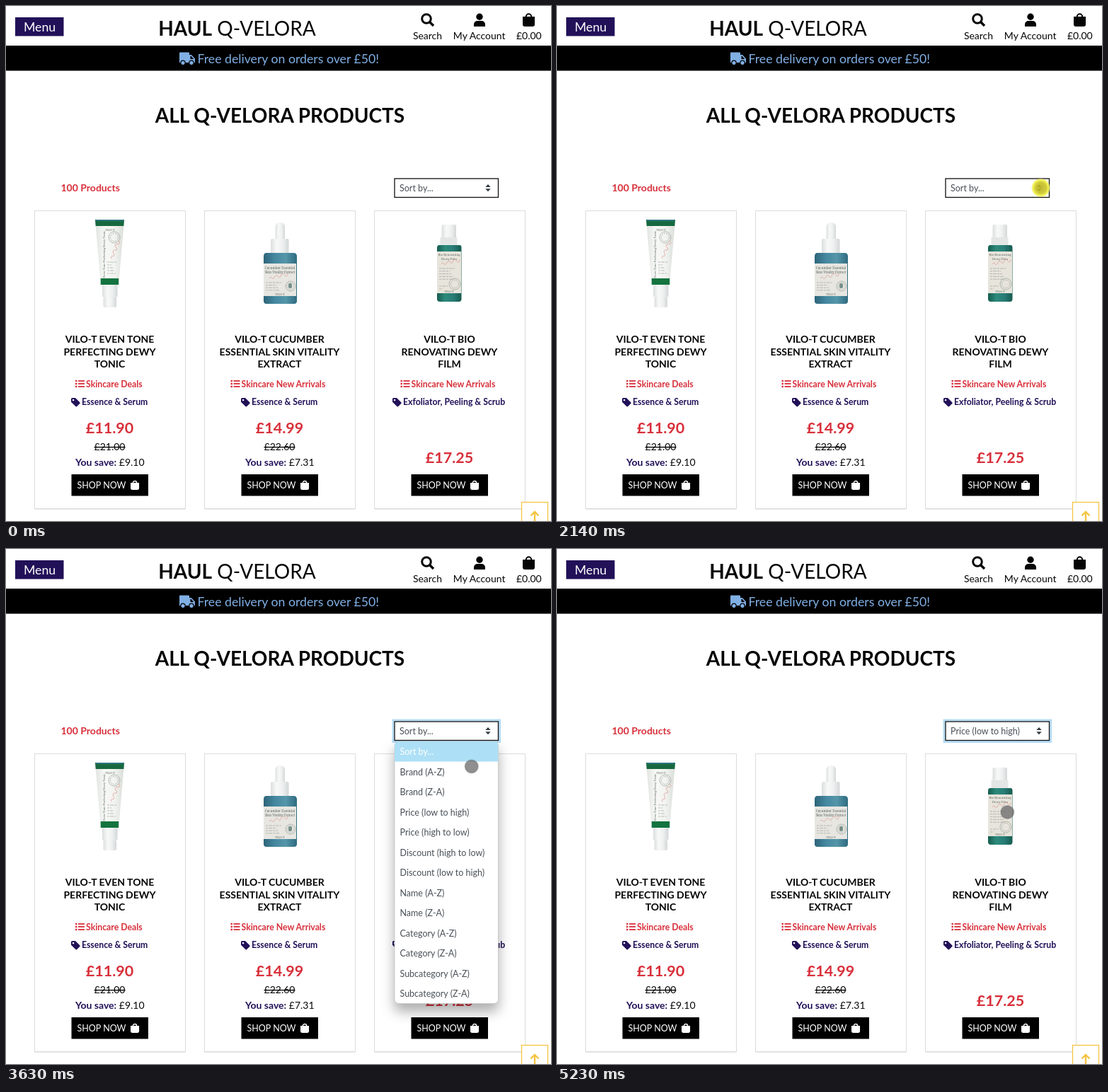
These frames come from a looping animation (770 px wide and 728 px high, 8000 ms). An HTML page:

```html
<!DOCTYPE html>
<html lang="en">
<head>
<meta charset="utf-8">
<title>Shop sorting</title>
<style>
html, body { margin: 0; width: 100%; height: 100%; overflow: hidden; background: #fff; }
svg { display: block; width: 100%; height: 100%; font-family: Lato, sans-serif; }
#menu { filter: drop-shadow(0 11px 9px rgba(0,0,0,.32)); }
.tiny { font-family: "Noto Serif", serif; }
</style>
</head>
<body>
<svg id="stage" viewBox="0 0 770 728"></svg>
<script>
const RED = '#d8303b', NAVY = '#221158', INK = '#050505', SKY = '#80afe4', GOLD = '#f6c443';
const BASE = 14, SMALL = 12.5, LABEL = 12.25, LARGE = 17.7, HUGE = 28;
const ROW = 28.5, MENU_TOP = 272;

const text = (x, y, size, str, fill = INK, weight = 400, anchor = 'start', extra = '') =>
  `<text x="${x}" y="${y}" font-size="${size}" fill="${fill}" font-weight="${weight}" text-anchor="${anchor}" ${extra}>${str}</text>`;
const rect = (x, y, w, h, fill, extra = '') =>
  `<rect x="${x}" y="${y}" width="${w}" height="${h}" fill="${fill}" ${extra}/>`;
const path = (d, fill, extra = '') => `<path d="${d}" fill="${fill}" ${extra}/>`;
const line = (d, stroke, width) => path(d, 'none', `stroke="${stroke}" stroke-width="${width}"`);
const move = (x, y, body, scale = 1) => `<g transform="translate(${x} ${y}) scale(${scale})">${body}</g>`;
const gradient = (id, ...colors) => `<linearGradient id="${id}">` +
  colors.map((c, i) => `<stop offset="${i / (colors.length - 1)}" stop-color="${c}"/>`).join('') + '</linearGradient>';

const bag = (x, y, fill, scale = 1) => move(x, y,
  path('M0 5H17V16a3 3 0 0 1-3 3H3a3 3 0 0 1-3-3Z', fill) +
  line('M4.8 8V5a3.7 3.7 0 0 1 7.4 0V8', fill, 2), scale);

const listIcon = x => [530, 534, 538].map(y =>
  rect(x, y - 1.2, 2.4, 2.4, RED) + rect(x + 4, y - .9, 9, 1.8, RED)).join('');

const tagIcon = x => move(x, 554,
  path('M0 1.5Q0 0 1.5 0H6L12.3 6.2q.8.9 0 1.8L8.2 12q-.9.8-1.8 0L0 5.8ZM3 1.7a1.3 1.3 0 1 0 .1 0Z', NAVY, 'fill-rule="evenodd"'));

const smallPrint = (x, y, w, rows, gap) => Array.from({ length: rows }, (_, i) =>
  `<path d="M${x} ${y + i * gap}h${w - (i * 7) % 9}" stroke="#a0a49f" stroke-width=".7" stroke-dasharray="3 1 5 1"/>`).join('');
const scribble = (x, y, turn = -8) =>
  `<path transform="translate(${x} ${y}) rotate(${turn})" d="M0 0q3-3 4 0t4-1 5 0 4-1 5 0 5-1" fill="none" stroke="#e09a96" stroke-width=".7"/>`;
const seal = (x, y, r) => `<g fill="none" stroke="#9aa29d" stroke-width=".7"><circle cx="${x}" cy="${y}" r="${r}"/>` +
  `<circle cx="${x}" cy="${y}" r="${r * .7}" stroke-dasharray="2 1"/></g>`;
const tiny = (x, y, size, str, extra = '') => text(x, y, size, str, '#59645f', 400, 'middle', 'class="tiny" ' + extra);

const tube =
  path('M126 303H167L159.5 389H133.5Z', 'url(#tubeBody)') +
  path('M126 302H167L166.3 311H126.7Z', '#17683f') + rect(127, 302, 39, 2, '#2c7680') +
  tiny(147, 318, 4, 'VILO-T') + seal(153, 327, 8) +
  tiny(0, 0, 4.2, 'Even Tone Perfecting Dewy Tonic', 'transform="translate(140 351) rotate(-90)"') +
  scribble(149, 357, -62) + smallPrint(143, 362, 13, 5, 4) +
  rect(133.7, 385, 25.5, 9, '#14733f') +
  rect(136, 394, 21.5, 17, 'url(#plastic)') + rect(137.5, 411, 18.5, 15, 'url(#plastic)', 'rx="2"');

const dropper =
  rect(380.5, 306, 13.5, 28, 'url(#plastic)', 'rx="6"') +
  rect(374, 329, 25.5, 21, 'url(#plastic)', 'rx="2"') +
  path('M368 349H406Q411 349 411 354V417Q411 421 407 421H368Q364 421 364 417V354Q364 349 368 349Z', 'url(#blueGlass)') +
  rect(364, 364, 46, 46, '#e7e6e1') +
  tiny(387, 372, 4.5, 'Cucumber Essential') + tiny(387, 378, 4.5, 'Skin Vitality Extract') +
  scribble(372, 385) + smallPrint(367, 391, 22, 4, 3.6) + seal(402, 396, 7) + rect(399, 392, 5, 7, '#77918a', 'rx="2"') +
  tiny(387, 409, 4, 'VILO-T');

const pump =
  rect(615.5, 309, 20.5, 22, 'url(#plastic)', 'rx="2"') + rect(613.5, 327, 24, 12, '#e3e6e5', 'rx="1"') +
  path('M612 338H641Q643.5 338 643.5 342V414Q643.5 418 640 418H613Q609 418 609 414V342Q609 338 612 338Z', 'url(#greenGlass)') +
  rect(609, 347, 34, 59, '#e7e4db') +
  tiny(626, 353, 4.3, 'Bio Renovating') + tiny(626, 359, 4.3, 'Dewy Film') +
  scribble(615, 365) + smallPrint(612, 371, 22, 5, 3.8) + seal(634, 393, 8) + smallPrint(612, 396, 12, 2, 4) +
  tiny(626, 405, 4, 'VILO-T');

const products = [
  { title: ['VILO-T EVEN TONE', 'PERFECTING DEWY', 'TONIC'], list: 'Skincare Deals', listX: 98,
    tag: 'Essence &amp; Serum', tagX: 92, price: '£11.90', old: '£21.00', save: '£9.10', image: tube },
  { title: ['VILO-T CUCUMBER', 'ESSENTIAL SKIN VITALITY', 'EXTRACT'], list: 'Skincare New Arrivals', listX: 317.5,
    tag: 'Essence &amp; Serum', tagX: 332, price: '£14.99', old: '£22.60', save: '£7.31', image: dropper },
  { title: ['VILO-T BIO', 'RENOVATING DEWY', 'FILM'], list: 'Skincare New Arrivals', listX: 557.5,
    tag: 'Exfoliator, Peeling &amp; Scrub', tagX: 546, price: '£17.25', image: pump },
];

const card = (p, i) => {
  const x = 40 + 240 * i, mid = x + 106.5;
  return rect(x + .5, 290.5, 213, 421.5, '#e9e9e9') +
    rect(x + .5, 289.5, 213, 421, '#fff', 'stroke="#dcdcdc"') + p.image +
    p.title.map((s, n) => text(mid, 476.2 + 17.4 * n, BASE, s, INK, 700, 'middle')).join('') +
    listIcon(p.listX) + text(p.listX + 15, 538.7, LABEL, p.list, RED, 700) +
    tagIcon(p.tagX) + text(p.tagX + 15, 564.4, LABEL, p.tag, NAVY, 700) +
    text(mid, p.old ? 603.7 : 646.3, 21.5, p.price, RED, 700, 'middle') +
    (p.old ? text(mid, 628.3, BASE, p.old, INK, 400, 'middle', 'text-decoration="line-through"') +
      text(x + 58, 649.8, BASE, `<tspan fill="${NAVY}" font-weight="700">You save:</tspan> ${p.save}`) : '') +
    rect(x + 52.5, 662, 108.5, 30.5, '#000') + text(x + 60.5, 682, SMALL, 'SHOP NOW', '#fff') +
    bag(x + 136, 670.5, '#fff', .71);
};

const header =
  rect(13, 16, 68.5, 26.5, NAVY) + text(47.5, 36.2, LARGE, 'Menu', '#fff', 400, 'middle') +
  text(326.5, 41.6, HUGE, '<tspan font-weight="700">HAUL</tspan> Q-VELORA', INK, 400, 'middle') +
  '<circle cx="594" cy="18" r="6.3" fill="none" stroke="#050505" stroke-width="3"/>' + line('M598.5 22.5L604 28', INK, 3.4) +
  '<circle cx="669" cy="15.2" r="4.7"/>' + path('M661 29V26a5 5 0 0 1 5-5h6a5 5 0 0 1 5 5v3Z', INK) +
  bag(730, 10, INK) +
  [[595.5, 'Search'], [668.7, 'My Account'], [738.8, '£0.00']].map(([x, s]) => text(x, 47, BASE, s, INK, 400, 'middle')).join('') +
  rect(0, 56, 770, 35.5, '#000') +
  path('M245 66.5q0-1 1-1h12q1 0 1 1V69h3l5 5.5V80h-22ZM260.5 70.7V75h4.7l-3.6-4.3Z', SKY, 'fill-rule="evenodd"') +
  [250, 262].map(x => `<circle cx="${x}" cy="80.3" r="3.2" fill="${SKY}" stroke="#000" stroke-width="1.2"/>`).join('') +
  text(270.5, 80.8, LARGE, 'Free delivery on orders over £50!', SKY) +
  text(387, 165, HUGE, 'ALL Q-VELORA PRODUCTS', INK, 700, 'middle') +
  text(77.5, 262, BASE, '100 Products', RED, 700);

const select =
  rect(547, 242, 150.5, 30.5, 'none', 'id="glow" stroke="#b5dcf5" stroke-width="3"') +
  rect(549, 244, 146.5, 26.5, '#fff', 'stroke="#111" stroke-width="1.3"') +
  text(556, 262, SMALL, '', '#495057', 400, 'start', 'id="choice"') +
  path('M677.3 256L681 252L684.7 256ZM677.3 258.3L681 262.3L684.7 258.3Z', '#343a40');

const options = ['Sort by...', 'Brand (A-Z)', 'Brand (Z-A)', 'Price (low to high)', 'Price (high to low)',
  'Discount (high to low)', 'Discount (low to high)', 'Name (A-Z)', 'Name (Z-A)', 'Category (A-Z)',
  'Category (Z-A)', 'Subcategory (A-Z)', 'Subcategory (Z-A)'];
const menuBox = `x="549" y="${MENU_TOP}" width="146.5" height="${ROW * options.length}" rx="6"`;
const menu = `<g id="menu"><rect ${menuBox} fill="#fff" stroke="#c4c4c4" stroke-width=".8"/>` +
  rect(549, MENU_TOP, 146.5, ROW, '#ade0f6', 'id="bar" clip-path="url(#menuClip)"') +
  options.map((s, i) => text(556.5, 291.3 + ROW * i, SMALL, s, '#495057', 400, 'start', 'class="option"')).join('') + '</g>';

document.getElementById('stage').innerHTML = '<defs>' +
  gradient('tubeBody', '#dfe3df', '#f8f9f6', '#f1f3ef', '#d9ddd8') +
  gradient('plastic', '#dcdfdf', '#f8f8f8', '#eef0f0', '#d3d7d7') +
  gradient('blueGlass', '#2d6479', '#4488a0', '#5596a9', '#2e6b80') +
  gradient('greenGlass', '#155c4f', '#2d8a7b', '#297c77', '#175b4e') +
  '<radialGradient id="click"><stop offset="0" stop-color="#b8b11e"/><stop offset=".6" stop-color="#c9c525"/>' +
  '<stop offset=".74" stop-color="#ebe83a"/><stop offset=".88" stop-color="#f4f157"/>' +
  '<stop offset="1" stop-color="#f8f680" stop-opacity="0"/></radialGradient>' +
  `<clipPath id="menuClip"><rect ${menuBox}/></clipPath></defs>` +
  rect(0, 0, 770, 728, '#fff') + header + products.map(card).join('') +
  rect(728.5, 701.5, 37, 30, '#fff', `stroke="${GOLD}" stroke-width="1.3"`) +
  line('M747 728V715.5M741.5 720.5L747 715L752.5 720.5', GOLD, 2.4) +
  select + menu +
  '<g id="cursor"><circle id="dot" r="9.3" fill="#5a5a5a" fill-opacity=".68" stroke="#777" stroke-opacity=".45" stroke-width="1.6"/>' +
  '<circle id="press" r="13.5" fill="url(#click)" opacity=".9"/></g>';

const $ = id => document.getElementById(id);
const optionNodes = document.querySelectorAll('.option');
const mix = (a, b, p) => a + (b - a) * p;
const smooth = p => p * p * (3 - 2 * p);
const stepOf = (t, start, gap, last) => Math.min(last, Math.floor((t - start) / gap + .1));

function cursorAt(t) {
  if (t < 610) return [753, 800];
  if (t < 1450) {
    const left = 1 - stepOf(t, 610, 77, 10) / 10;
    return [685 + 68 * left ** 2, 260 + 462 * left ** 3];
  }
  if (t < 1750) return [684, 260];
  if (t < 3260) return [683.5, 257];
  if (t < 4100) {
    const p = smooth((stepOf(t, 3260, 75, 10) + 1) / 11);
    return [mix(683.5, 631, p ** 1.26), mix(257, 386, p ** 1.66)];
  }
  const p = smooth(stepOf(t, 4100, 90, 4) / 4);
  return [mix(628, 636.3, p), mix(389, 372, p)];
}

function draw() {
  const t = performance.now() % 8000;
  const [x, y] = cursorAt(t);
  const pressed = (t >= 2140 && t < 2430) || (t >= 4990 && t < 5140);
  const active = t < 4990 ? 0 : 3;
  $('cursor').setAttribute('transform', `translate(${x} ${y})`);
  $('dot').setAttribute('visibility', pressed ? 'hidden' : 'visible');
  $('press').setAttribute('visibility', pressed ? 'visible' : 'hidden');
  $('menu').setAttribute('opacity', t < 2430 || t >= 5230 ? 0 : t >= 5140 ? .4 : 1);
  $('glow').setAttribute('opacity', t < 2570 ? 0 : t < 2640 ? .5 : 1);
  $('bar').setAttribute('y', MENU_TOP + ROW * active);
  $('choice').textContent = options[t < 5140 ? 0 : 3];
  optionNodes.forEach((node, i) => node.setAttribute('fill', i === active ? '#fff' : '#495057'));
  requestAnimationFrame(draw);
}
draw();
</script>
</body>
</html>
```
